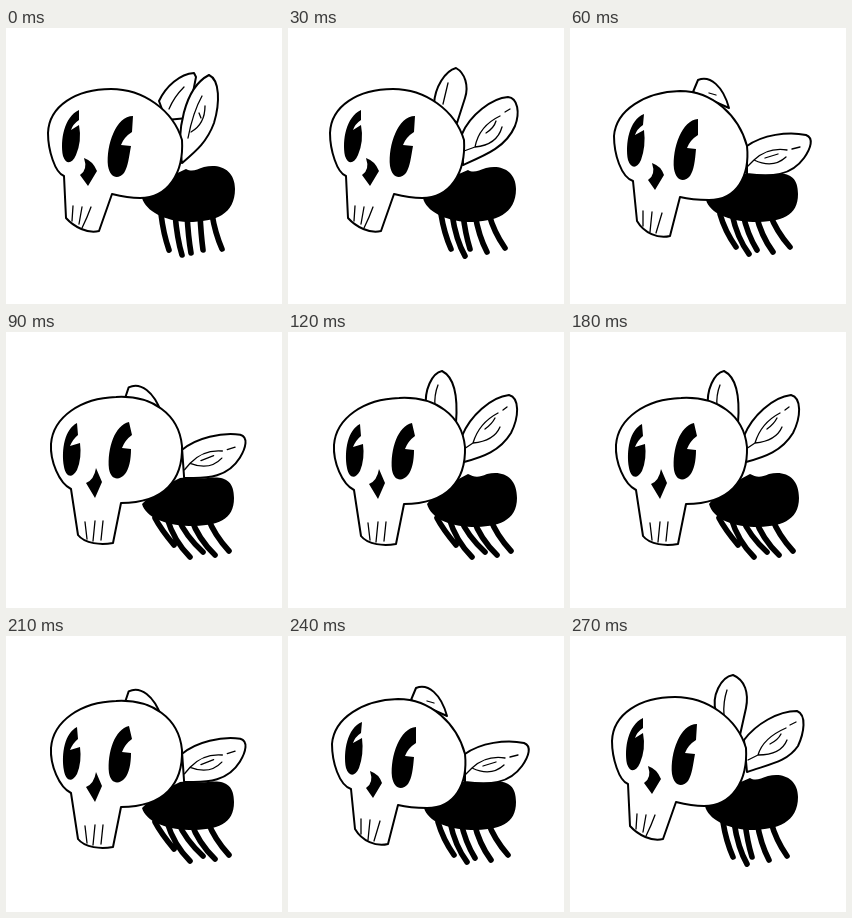
Recreate the animation shown at these times as an HTML page. Size 276x276 px, loop 0.3 s.

```html
<!DOCTYPE html>
<html lang="en">
<head>
<meta charset="utf-8">
<title>Skull fly</title>
<style>
html, body { margin: 0; height: 100%; overflow: hidden; background: #fff; }
svg { display: block; width: 100vw; height: 100vh; }
path { stroke-linecap: round; stroke-linejoin: round; }
.line { fill: #fff; stroke: #000; stroke-width: 2; }
.thin { fill: none; stroke: #000; stroke-width: 1.3; }
.legs { fill: none; stroke: #000; stroke-width: 5.6; }
</style>
</head>
<body>
<svg id="stage" viewBox="0 0 276 276"></svg>
<script>
const heads = {
  left: {
    skull: 'M60 190L58 148C49 145 42 122 42 105C43 78 70 61 105 61C137 61 167 82 176 112C178 145 162 170 134 170C124 170 114 168 106 166L93 203C82 206 68 199 60 190Z',
    face: 'M73 82L73 92Q67 96 65 102L73 97Q76 113 70 127C66 136 60 137 57 128C54 112 58 89 73 82ZM127 88L126 104Q118 109 115 117L125 118C123 129 122 139 118 145C112 152 104 150 102 138C100 117 110 88 127 88ZM78 130Q87 133 91 143L82 158L74 147Q82 142 78 130Z',
    teeth: 'M67 178L66 193M76 179L73 196M85 179Q81 190 76 200'
  },
  mid: {
    skull: 'M67 193L63 153C51 149 44 126 44 108C46 82 75 64 110 63C143 63 169 88 177 118C180 148 167 172 139 172C127 172 118 171 110 169L100 208C88 211 74 205 67 193Z',
    face: 'M74 86L73 97Q67 101 65 107L74 102Q76 118 71 132C67 141 61 141 58 132C55 116 59 92 74 86ZM128 91L128 107Q120 112 117 120L126 121C125 133 124 142 120 148C114 155 106 153 104 141C102 120 112 92 128 91ZM82 135Q91 138 94 147L85 162L78 152Q86 147 82 135Z',
    teeth: 'M73 183L73 198M82 184L80 204M92 185Q89 195 86 205'
  },
  right: {
    skull: 'M73 204L66 158C54 152 45 130 46 113C48 86 76 67 111 66C147 64 174 83 177 115C178 148 160 172 116 172L108 212C96 214 80 213 73 204Z',
    face: 'M72 92L73 104Q68 108 65 115L75 112Q77 127 72 139C67 148 61 146 59 136C56 118 60 98 72 92ZM124 91L127 104Q120 109 117 117L126 118C126 129 124 138 120 143C114 150 106 149 104 138C102 117 110 94 124 91ZM91 137L97 151L90 167L81 152Q89 149 91 137Z',
    teeth: 'M80 191L82 208M90 190L88 210M98 190L96 209'
  }
};

const wings = {
  up: {
    back: 'M153 73C160 58 174 46 188 45L190 49L182 90L160 92Z',
    front: 'M176 135C170 105 178 60 203 47C214 52 214 75 208 95C201 114 190 123 176 135Z',
    vein: 'M163 81Q168 69 178 59M182 110Q187 84 196 68M185 104Q199 96 199 78M193 85L195 90'
  },
  high: {
    back: 'M146 76C147 59 157 43 168 40C177 45 181 58 177 70L169 95Z',
    front: 'M174 106C182 87 204 70 220 69C230 70 232 85 227 98C218 119 198 127 175 137Z',
    vein: 'M155 76L160 55M176 123L187 119Q191 98 212 88M187 119Q209 117 214 99M198 105Q206 100 208 93M217 84L222 81'
  },
  wide: {
    back: 'M146 76C141 60 151 41 163 39C175 44 179 57 176 72L170 99Z',
    front: 'M174 104C186 88 208 75 227 75C237 79 234 97 228 110C217 126 200 128 177 136Z',
    vein: 'M154 79Q153 66 157 54M178 124L188 119Q193 102 216 92M188 119Q211 119 217 104M200 108Q208 104 211 98M220 89L226 86'
  },
  low: {
    back: 'M123 64L128 52C140 47 153 58 159 80Z',
    front: 'M177 118C192 107 218 103 236 107C244 110 241 120 234 130C221 148 202 149 177 146Z',
    vein: 'M139 65L146 67M178 138L184 132Q198 119 217 122M184 132Q203 141 216 129M195 130L208 126M222 121L230 119'
  },
  rise: {
    back: 'M138 76C136 58 144 41 154 39C166 45 170 65 168 91Z',
    front: 'M174 104C182 84 203 65 221 63C232 66 231 85 223 101C212 119 195 125 176 130Z',
    vein: 'M147 75Q146 63 150 53M176 117L185 111Q191 91 210 81M185 111Q206 109 212 95M197 97Q204 92 207 86M215 78L219 75'
  }
};

const bodies = {
  tall: 'M136 170C140 183 158 193 182 194C210 194 229 186 229 161C229 142 214 135 198 139C190 142 186 144 180 141L150 155Z',
  round: 'M135 170C138 183 157 193 180 194C208 194 228 186 228 161C228 143 213 136 198 140C190 143 185 145 180 142L150 155Z',
  flat: 'M136 172C140 185 158 193 183 194C212 194 228 188 228 166C228 148 218 144 202 146C190 147 182 145 174 146L150 158Z',
  low: 'M139 172C143 186 160 194 184 195C210 195 229 189 229 166C229 146 216 138 199 142C190 146 186 145 180 142L150 158Z'
};

// each leg: hip x, foot x, foot y
const legs = {
  hang: [[155, 163, 222], [169, 176, 227], [181, 185, 225], [194, 197, 222], [206, 216, 221]],
  lean: [[153, 163, 221], [164, 177, 228], [175, 182, 221], [187, 199, 224], [201, 217, 220]],
  trail: [[150, 166, 219], [162, 179, 226], [173, 187, 222], [186, 203, 224], [200, 220, 219]],
  swept: [[149, 168, 213], [161, 184, 225], [172, 197, 220], [185, 209, 223], [202, 223, 219]]
};

const legPath = set => set.map(([hip, x, y]) =>
  `M${hip} 186Q${hip + (x - hip) * 0.3} ${y - 16} ${x} ${y}`).join('');

const path = (cls, d) => `<path class="${cls}" d="${d}"/>`;

function pose(wing, body, leg, head, wingMove = '', headMove = '') {
  const w = wings[wing], h = heads[head];
  return `<g visibility="hidden">
    ${path('legs', legPath(legs[leg]))}${path('', bodies[body])}
    <g transform="${wingMove}">${path('line', w.back)}${path('line', w.front)}${path('thin', w.vein)}</g>
    <g transform="${headMove}">${path('line', h.skull)}${path('', h.face)}${path('thin', h.teeth)}</g>
  </g>`;
}

const poses = [
  pose('up', 'tall', 'hang', 'left'),
  pose('high', 'round', 'lean', 'left'),
  pose('low', 'flat', 'trail', 'mid'),
  pose('low', 'flat', 'swept', 'right', 'rotate(-4 174 130)', 'translate(-1 -1)'),
  pose('rise', 'low', 'swept', 'right'),
  pose('up', 'low', 'swept', 'right', 'translate(-6 -9)'),
  pose('wide', 'round', 'lean', 'left')
];
const order = [0, 1, 2, 3, 4, 5, 4, 3, 2, 6];
const step = 30;

const stage = document.getElementById('stage');
stage.innerHTML = poses.join('');
const cels = [...stage.children];
let shown = null;

function draw() {
  const cel = cels[order[Math.floor(performance.now() / step) % order.length]];
  if (cel !== shown) {
    if (shown) shown.setAttribute('visibility', 'hidden');
    cel.setAttribute('visibility', 'visible');
    shown = cel;
  }
  requestAnimationFrame(draw);
}
draw();
</script>
</body>
</html>
```
